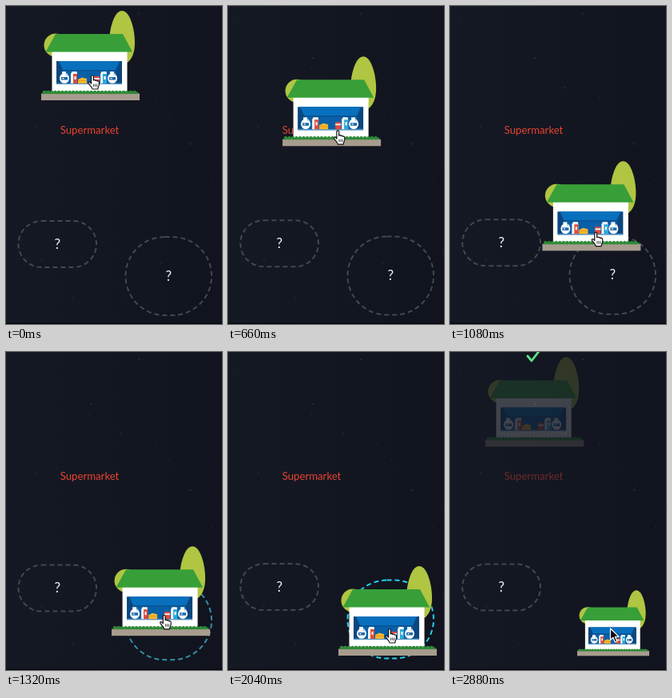
An HTML page with a canvas that plays this animation: 270x398 px, repeating every 2.9 s.

```html
<!DOCTYPE html>
<html lang="en">
<head>
<meta charset="utf-8">
<title>Drag and drop</title>
<style>
html, body { margin: 0; width: 100%; height: 100%; overflow: hidden; background: #12151f; }
canvas { display: block; width: 270px; height: 398px; }
</style>
</head>
<body>
<canvas id="stage"></canvas>
<script>
const W = 270, H = 398, LOOP = 2900, DROP = 2092, TAU = Math.PI * 2;
const dpr = window.devicePixelRatio || 1;

function makeCanvas(el) {
  el.width = W * dpr;
  el.height = H * dpr;
  const c = el.getContext('2d');
  c.scale(dpr, dpr);
  return c;
}
const layerEl = document.createElement('canvas');
const ctx = makeCanvas(document.getElementById('stage'));
const layer = makeCanvas(layerEl);

const clamp = v => Math.max(0, Math.min(1, v));
const ramp = (t, a, b) => clamp((t - a) / (b - a));
const ease = p => p * p * (3 - 2 * p);
const mix = (a, b, p) => a + (b - a) * p;
const blend = (a, b, p) => `rgb(${a.map((v, i) => Math.round(mix(v, b[i], p)))})`;

// Drag path: time, x offset, y offset
const path = [
  [230, 0, 0], [540, 2, 32], [660, 24, 57], [900, 55, 142],
  [1320, 88, 237], [1620, 94, 262], [1900, 94, 262]
];

function slope(i, k) {
  if (i === 0 || i >= path.length - 2) return 0;
  const a = path[i - 1], b = path[i + 1];
  return (b[k] - a[k]) / (b[0] - a[0]);
}

function along(t, k) {
  if (t <= path[0][0]) return path[0][k];
  for (let i = 0; i < path.length - 1; i++) {
    const a = path[i], b = path[i + 1];
    if (t > b[0]) continue;
    const d = b[0] - a[0], u = (t - a[0]) / d, v = 1 - u;
    return a[k] * v * v * (1 + 2 * u) + b[k] * u * u * (3 - 2 * u)
      + d * u * v * (slope(i, k) * v - slope(i + 1, k) * u);
  }
  return path[path.length - 1][k];
}

// Remaining share of the way home, with a small overshoot
function spring(ms) {
  const s = ms / 100, z = 0.68, w = 0.733;
  return Math.exp(-z * s) * (Math.cos(w * s) + z / w * Math.sin(w * s));
}

function box(c, color, x, y, w, h) {
  c.fillStyle = color;
  c.fillRect(x, y, w, h);
}

function poly(c, color, ...p) {
  c.fillStyle = color;
  c.beginPath();
  for (let i = 0; i < p.length; i += 2) c.lineTo(p[i], p[i + 1]);
  c.fill();
}

function oval(c, color, x, y, rx, ry) {
  c.fillStyle = color;
  c.beginPath();
  c.ellipse(x, y, rx, ry, 0, 0, TAU);
  c.fill();
}

function bottle(c, x) {
  box(c, '#e9f2f8', x - 3, 82, 5, 4);
  oval(c, '#ffffff', x, 90.5, 6, 6.3);
  box(c, '#1b67ab', x - 4, 89, 8, 3.5);
  box(c, '#ffffff', x - 2.5, 90, 2, 1.3);
  box(c, '#b9d7ea', x + 1.5, 84.5, 2.5, 2.5);
}

function carton(c, x, color) {
  poly(c, '#f4f6f7', x - 4, 85, x - 2.5, 82, x + 3.5, 82, x + 4, 85, x + 4, 97, x - 4, 97);
  box(c, color, x - 1, 85, 5, 12);
  box(c, '#ffffff', x + 0.5, 88, 2, 4);
}

function house(c) {
  const leaf = '#b0c542';
  c.fillStyle = leaf;
  c.beginPath();
  c.moveTo(145, 6);
  c.bezierCurveTo(155, 6, 161, 29, 161, 46);
  c.bezierCurveTo(161, 82, 129, 82, 129, 46);
  c.bezierCurveTo(129, 29, 135, 6, 145, 6);
  c.fill();
  oval(c, leaf, 62, 49, 14.5, 14.5);

  box(c, '#ffffff', 57.5, 56, 94, 52);
  poly(c, '#389f38', 62, 35, 146, 35, 158, 57.5, 49.5, 57.5);

  box(c, '#0b477f', 63, 69, 82, 29);
  poly(c, '#0870bd', 66, 69, 142, 69, 137, 80, 71, 80);
  box(c, '#0860a8', 71, 80, 66, 16);
  box(c, '#0b5291', 71, 80, 66, 1.5);
  box(c, '#4b8fc4', 63, 96.5, 82, 1.5);

  bottle(c, 73);
  carton(c, 85, '#e04a3a');
  poly(c, '#f5b72f', 90, 92, 95, 89.5, 101, 91, 101, 97, 90, 97);
  box(c, '#e89a22', 90, 93, 11, 1);
  box(c, '#e04a3a', 110, 88, 7, 9);
  box(c, '#f7e9e4', 110, 90, 7, 2);
  carton(c, 122, '#2ba9d6');
  bottle(c, 133);

  box(c, '#a79c8e', 44, 109.5, 123, 8.5);
  box(c, '#2f8b38', 46, 107.5, 119, 2.3);
  for (let x = 48; x < 165; x += 4.5) oval(c, '#2f8b38', x, 108, 2.3, 2.2);
}

function houseAt(c, x, y, s = 1) {
  c.save();
  c.translate(x, y);
  c.scale(s, s);
  c.translate(-44, -118);
  house(c);
  c.restore();
}

function ghost(x, y, alpha) {
  layer.clearRect(0, 0, W, H);
  houseAt(layer, x, y);
  ctx.globalAlpha = alpha;
  ctx.drawImage(layerEl, 0, 0, W, H);
  ctx.globalAlpha = 1;
}

function text(str, x, y, size, color) {
  ctx.font = `${size}px Lato, "Open Sans", sans-serif`;
  ctx.textAlign = 'center';
  ctx.fillStyle = color;
  ctx.fillText(str, x, y);
}

function slot(x, y, w, h, color) {
  ctx.strokeStyle = color;
  ctx.lineWidth = 2;
  ctx.setLineDash([6, 4]);
  ctx.beginPath();
  ctx.roundRect(x + 1, y + 1, w - 2, h - 2, h / 2 - 1);
  ctx.stroke();
  ctx.setLineDash([]);
  text('?', x + w / 2, y + h / 2 + 5.5, 17, '#f4f5f7');
}

const handShape = new Path2D('M4.5 2C4.5 .3 7.3 .3 7.3 2V7C7.6 6 9.7 6.2 9.8 7.4C10.2 6.6 12 6.9 12 8.1C12.5 7.5 14.4 7.9 14.4 9.4V12C14.4 14 12.8 15 12.8 18H6C6 16 3 13.5 1.2 10.8C.3 9.2 2 8.3 3 9.4L4.5 11Z');
const handLines = new Path2D('M7.6 11.5V15M9.6 11.5V15M11.6 11.5V15');
const arrowShape = new Path2D('M0 0V14.5L3.4 11.3L5.8 17L8.3 16L5.9 10.4H10.6Z');

function cursor(x, y, shape, fill, line) {
  ctx.save();
  ctx.translate(x, y);
  ctx.lineJoin = 'round';
  ctx.lineWidth = 1.2;
  ctx.fillStyle = fill;
  ctx.strokeStyle = line;
  ctx.fill(shape);
  ctx.stroke(shape);
  if (shape === handShape) {
    ctx.lineWidth = 0.8;
    ctx.stroke(handLines);
  }
  ctx.restore();
}

function check(p) {
  if (p <= 0) return;
  ctx.strokeStyle = '#5ce08a';
  ctx.lineWidth = 2.8;
  ctx.lineCap = ctx.lineJoin = 'round';
  const a = clamp(p / 0.4), b = clamp((p - 0.4) / 0.6);
  ctx.beginPath();
  ctx.moveTo(97, 5);
  ctx.lineTo(97 + 5 * a, 5 + 6 * a);
  if (b > 0) ctx.lineTo(102 + 10 * b, 11 - 13 * b);
  ctx.stroke();
  ctx.lineCap = 'butt';
}

let seed = 11;
const rand = () => (seed = seed * 16807 % 2147483647) / 2147483647;
const stars = Array.from({ length: 42 }, () => [rand() * W, rand() * H, 0.5 + rand() * 0.6, 0.05 + rand() * 0.1]);

const sky = ctx.createLinearGradient(0, 0, W, 0);
sky.addColorStop(0, '#151924');
sky.addColorStop(1, '#11141e');

function draw(t) {
  box(ctx, sky, 0, 0, W, H);
  for (const [x, y, r, a] of stars) oval(ctx, `rgba(190,200,220,${a})`, x, y, r, r);
  box(ctx, '#05060a', 0, 396.8, W, 1.2);

  const dropped = t >= DROP;
  const leftY = 268 - 2 + 2 * Math.cos(Math.PI * t / 2300);
  const float = -2.2 + 2.2 * Math.cos(Math.PI * t / 3000);
  const grey = [67, 71, 80];

  ctx.globalAlpha = mix(1, 0.42, ramp(t, DROP, DROP + 350));
  text('Supermarket', 104.5, 160, 13.2, '#ea4230');
  ctx.globalAlpha = 1;

  slot(14.5, leftY, 99.5, 60, `rgb(${grey})`);
  if (!dropped) {
    const hot = ease(ramp(t, 1060, 1560));
    slot(148.5, 288 + float, 109.5, 100, blend(grey, [36, 207, 238], hot));
    houseAt(ctx, 44 + along(t, 1), 118 + along(t, 2));
  } else {
    const back = spring(t - DROP);
    ghost(44 + 94 * back, 118 + 262 * back, mix(1, 0.19, ramp(t, DROP, DROP + 150)));
    houseAt(ctx, 159, 384.7 + float, 0.732);
    check(ease(ramp(t, 2540, 2800)));
  }

  if (t < 2520) cursor(102 + along(t + 36, 1), 86 + along(t + 36, 2) - 2 * ramp(t, 1400, 1620), handShape, '#fff', '#111');
  else cursor(200.5, 346, arrowShape, '#0a0a0a', '#fff');
}

function tick() {
  draw(performance.now() % LOOP);
  requestAnimationFrame(tick);
}
tick();
</script>
</body>
</html>
```
